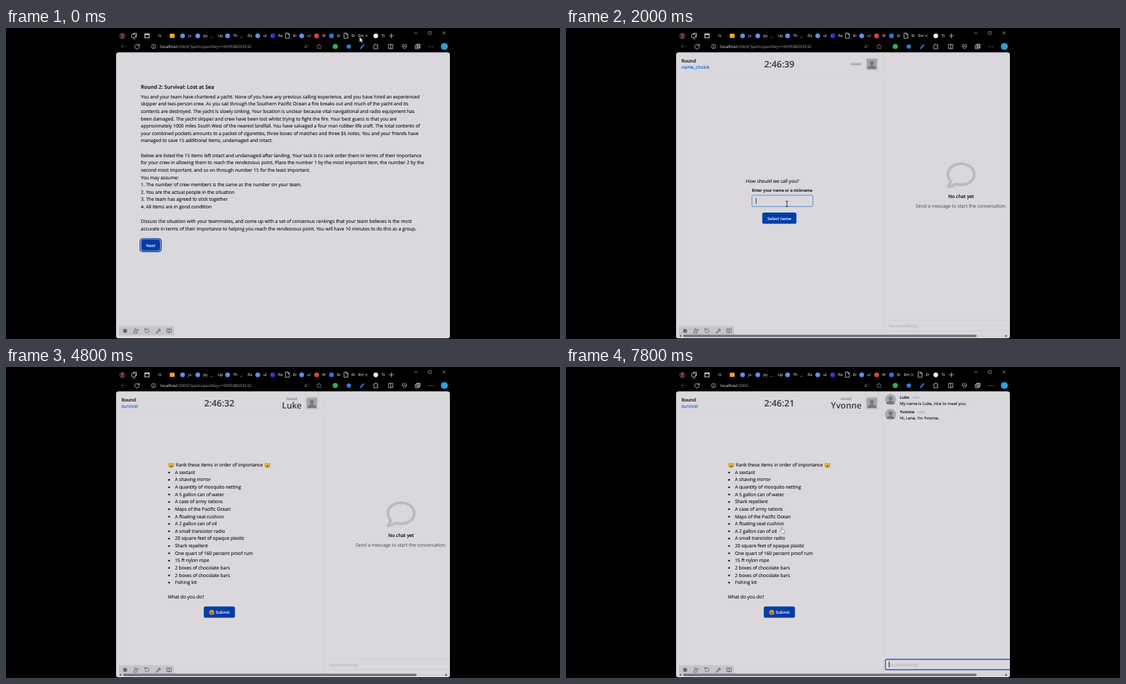
An HTML page for the animation above (8 s loop, 800 by 450 pixels).

```html
<!DOCTYPE html>
<html lang="en">
<head>
<meta charset="utf-8">
<title>Lost at Sea</title>
<style>
  html, body { margin: 0; width: 100%; height: 100%; overflow: hidden; background: #000; }
  svg { display: block; width: 100%; height: 100%; }
  text { font-family: "Open Sans", "Noto Sans", sans-serif; text-rendering: geometricPrecision; white-space: pre; }
</style>
</head>
<body>
<svg id="stage" viewBox="0 0 800 450"></svg>
<script>
const LOOP = 8000, TICK = 200, STEP = 10.62;
const INK = '#0d0c11', PAGE = '#dad8dc', BLUE = '#003da9', LINK = '#0b57c9', BODY = 6.71, SMALL = 5.92;
const USER = 'Luke', PEER = 'Yvonne';
const HELLO = `My name is ${USER}, nice to meet you.`, REPLY = `Hi, Lena. I'm ${PEER}.`;

const INTRO = [
  'You and your team have chartered a yacht. None of you have any previous sailing experience, and you have hired an experienced',
  'skipper and two-person crew. As you sail through the Southern Pacific Ocean a fire breaks out and much of the yacht and its',
  'contents are destroyed. The yacht is slowly sinking. Your location is unclear because vital navigational and radio equipment has',
  'been damaged. The yacht skipper and crew have been lost whilst trying to fight the fire. Your best guess is that you are',
  'approximately 1000 miles South West of the nearest landfall. You have salvaged a four man rubber life craft. The total contents of',
  'your combined pockets amounts to a packet of cigarettes, three boxes of matches and three $5 notes. You and your friends have',
  'managed to save 15 additional items, undamaged and intact.',
  '',
  'Below are listed the 15 items left intact and undamaged after landing. Your task is to rank order them in terms of their importance',
  'for your crew in allowing them to reach the rendezvous point. Place the number 1 by the most important item, the number 2 by the',
  'second most important, and so on through number 15 for the least important.',
  'You may assume:',
  '1. The number of crew members is the same as the number on your team.',
  '2. You are the actual people in the situation',
  '3. The team has agreed to stick together',
  '4. All items are in good condition',
  '',
  'Discuss the situation with your teammates, and come up with a set of consensus rankings that your team believes is the most',
  'accurate in terms of their importance to helping you reach the rendezvous point. You will have 10 minutes to do this as a group.'
];
const ITEMS = ['A sextant', 'A shaving mirror', 'A quantity of mosquito netting', 'A 5 gallon can of water',
  'A case of army rations', 'Maps of the Pacific Ocean', 'A floating seat cushion', 'A 2 gallon can of oil',
  'A small transistor radio', '20 square feet of opaque plastic', 'Shark repellent',
  'One quart of 160 percent proof rum', '15 ft nylon rope', '2 boxes of chocolate bars',
  '2 boxes of chocolate bars', 'Fishing kit'];
const RANKED = [...ITEMS];
RANKED.splice(4, 0, RANKED.splice(10, 1)[0]);

// Markup helpers; text is placed by its optical middle, with a hairline stroke for a firmer weight
const text = (x, y, s, size = BODY, fill = INK, weight = 400, extra = '') =>
  `<text x="${x}" y="${(y + size * .35).toFixed(2)}" font-size="${size}" fill="${fill}" stroke="${fill}" stroke-width=".1" font-weight="${weight}" ${extra}>${s}</text>`;
const rect = (x, y, w, h, fill, r = 0, extra = '') =>
  `<rect x="${x}" y="${y}" width="${w}" height="${h}" rx="${r}" fill="${fill}" ${extra}/>`;
const dot = (x, y, r, fill, extra = '') => `<circle cx="${x}" cy="${y}" r="${r}" fill="${fill}" ${extra}/>`;
const line = (d, stroke, w = .8, extra = '') =>
  `<path d="${d}" fill="none" stroke="${stroke}" stroke-width="${w}" stroke-linecap="round" stroke-linejoin="round" ${extra}/>`;
const group = (id, body) => `<g id="${id}">${body}</g>`;
const place = (x, y, body) => `<g transform="translate(${x} ${y})">${body}</g>`;
const MID = 'text-anchor="middle"', END = 'text-anchor="end"';
const button = (x, y, w, label, tx) =>
  rect(x, y, w, 16.3, BLUE, 2.6) + text(tx, y + 8.5, label, 5.8, '#e4e4ee', 600);

const docIcon = x => line(`M${x - 2.5} 7.3h3.2l2 2v5.6h-5.2zM${x + .6} 7.5v2h2`, '#d8d8d8');
const cross = (x, y, r) => line(`M${x - r} ${y - r}l${2 * r} ${2 * r}m0 ${-2 * r}l${-2 * r} ${2 * r}`, '#bbb', .7);
const label = (x, s) => text(x, 11.3, s, 5.6, '#c4c4c4');

function tabStrip() {
  const blue = '#5b93ea';
  const tabs = [[255, blue, 'jan'], [277, blue, 'py'], [298, '', 'Up'], [320, blue, 'Th'], [341, '', 'Ra'],
    [363.5, blue, 'ult'], [385, '#4a2fd0', 'Re'], [406.5, 'doc', 'Er'], [427, blue, 'ult'],
    [448.5, '#e5452c', 'W'], [470, '#2f78d6', 'Er'], [534, '#f0f0f0', 'Tc']];
  const icon = (x, c) => c === 'doc' ? docIcon(x) : c ? dot(x, 11.3, 3.4, c) : label(x - 2.5, '_');
  return tabs.map(([x, c, s]) => icon(x, c) + label(x + 8, s.slice(0, 2))).join('') +
    label(220, 'G') + rect(236.5, 8.2, 7, 6.2, '#f2a81c', 1) +
    group('tabA', docIcon(491) + label(499, 'Er') + label(508.5, 'Em') + cross(520.5, 11.3, 1.6)) +
    group('tabB', label(488, 'Em') + cross(500, 11.3, 1.6) + docIcon(511.5) + label(519.5, 'Er'));
}

function chrome() {
  const c = '#cfcfcf';
  return dot(168, 11.5, 4.8, '#3a2523') + dot(168, 10, 1.7, '#8b5a4c') + rect(165.5, 12.2, 5, 3.2, '#7d2f35', 1.6) +
    line('M182 9h5v5h-5zM184 9v-1.5h4.5v5H187M184 16h2', c) +
    line('M200.5 8.3h6.4v6h-6.4zM200.5 9.6h6.4', c, 1.1) +
    tabStrip() +
    line('M553.5 11.2h6m-3-3v6', c) + line('M590 7.3h3.6', '#bbb', .7) + line('M610.3 5.4h3.8v3.8h-3.8z', '#bbb', .6) + cross(632.3, 7.3, 1.9) +
    line('M173 26.8h-6.5m2.8-2.8l-2.8 2.8l2.8 2.8', '#4a4a4a') +
    line('M192.2 25.3a3.4 3.4 0 1 0 .4 2.4M192.6 23.3v2.4h-2.4', c) +
    dot(213, 26.8, 3.1, 'none', `stroke="${c}" stroke-width=".7"`) + line('M213 26.6v1.8m0-3.3v.1', c) +
    `<text x="223" y="29" font-size="5.92" fill="#f0f0f0">localhost<tspan fill="#a2a2a2" id="path"></tspan></text>` +
    text(431, 27, 'A', 6, '#8a8a8a') + line('M436 23.8q1.2 1 .1 2.4', '#8a8a8a', .6) +
    line('M452 23.3l1.1 2.3l2.5.3l-1.8 1.8l.5 2.5l-2.3-1.2l-2.3 1.2l.5-2.5l-1.8-1.8l2.5-.3z', '#999', .6) +
    dot(475.5, 26.8, 3.7, '#2fae55') + dot(495, 26.8, 3.1, '#2c7be0') +
    line('M512 29.5l4.5-5', '#2476e8', 2) +
    line('M531.5 24.5h1.5q0-1.5 1.2-1.5t1.2 1.5h1.6v1.8q-1.4 0-1.4 1t1.4 1v1.8h-5.5z', c) +
    line('M552.7 23.7h6v6.2h-6zM555.7 23.7v6.2', c) +
    line('M575.3 30l-3-3q-1-2 .4-3.1q1.6-.8 2.6.8q1-1.6 2.6-.8q1.4 1.1.4 3.1zM573 26.8h1.3l1-1.3l1 2l.6-.7h1.3', c, .7) +
    line('M591.5 25h5v5h-5zM593 25v-1.5h5v4.7h-1.3M594 26.3v2.5m-1.2-1.2h2.5', c, .9) +
    [611.5, 614, 616.5].map(x => dot(x, 27, .6, c)).join('') + dot(633, 26.8, 5, '#27a3dc');
}

function toolbar() {
  const c = '#55545a';
  return rect(163, 431.5, 80, 13.2, '#c6c4ca', 1.5) + dot(172, 438.3, 3, '#6b6a70') +
    dot(186.8, 436.6, 1.5, 'none', `stroke="${c}" stroke-width=".7"`) +
    line('M184 441.2q0-2.6 2.8-2.6t2.8 2.6zM189.2 437.2h2.2m-1.1-1.1v2.2', c, .7) +
    line('M201.2 436.4a2.9 2.9 0 1 1-.5 2.4M200.6 434.8v1.9h1.9', c) +
    line('M217 440.8l2.8-2.8q-.4-2.5 2.3-2.7l-1 1.3l.8.8l1.2-1q0 2.5-2.6 2.5l-2.6 2.8z', c) +
    line('M235.5 436q-1.5-.8-3.2-.6v5q1.7-.2 3.2.6q1.5-.8 3.2-.6v-5q-1.7-.2-3.2.6zv5', c);
}

const cat = x => place(x, 142,
  `<path d="M-3.6 -3.8l1.8 1.2h3.6l1.8-1.2l.3 5.4q-1 2.4-3.9 2.4t-3.9-2.4z" fill="#e6900f"/>` +
  dot(-1.4, -.6, .8, '#f6e3b0') + dot(1.4, -.6, .8, '#f6e3b0') + dot(0, 1.8, .9, '#6b3510') +
  dot(-3, 2.3, 1.1, '#f0aa35') + dot(3, 2.3, 1.1, '#f0aa35'));
const hug = place(297, 355, dot(0, 0, 3.5, '#eda52a') + dot(-1.2, -.9, .5, '#5c3010') + dot(1.2, -.9, .5, '#5c3010') +
  `<path d="M-1.7 .4h3.4q-.4 1.7-1.7 1.7t-1.7-1.7z" fill="#70330f"/>` + dot(-2.4, 2.2, 1.1, '#d9830f') + dot(2.4, 2.2, 1.1, '#d9830f'));

const person = dot(0, -1.6, 3, '#77767a') + `<path d="M-6 6.6q.4-4.6 6-4.6t6 4.6z" fill="#77767a"/>`;
const message = (id, y, who, words) => group(id,
  place(468.6, y + 3.5, dot(0, 0, 8, '#a9a8ac') + person) +
  text(482, y, `${who}<tspan dx="3.4" font-weight="400" fill="#96959c" stroke="none">now</tspan>`, SMALL, INK, 600) +
  text(482, y + 9, words, SMALL));

const FAINT = '#d1cfd4';
const game =
  line('M163 66.3h294', FAINT, .7) + line('M457.7 38v404', FAINT, .7) + line('M166.5 67v364', '#d5d3d8', .6) +
  text(166.7, 48, 'Round', BODY, INK, 600) + text(166.7, 57, '', 6.62, LINK, 500, 'id="stageName"') +
  text(308, 53, '', 12.8, '#3a3f4d', 600, `id="clock" ${MID}`) +
  text(0, 0, 'NAME', 5, '#85858e', 600, `id="nameTag" letter-spacing=".18" ${MID}`) +
  text(427, 56, '', 12.4, '#3f4350', 600, `id="player" ${END}`) +
  rect(431.5, 42.5, 20.5, 19.5, 'none', 2, `stroke="${FAINT}" stroke-width=".6"`) +
  group('avatar', place(441.7, 52.3, rect(-7.8, -8, 15.6, 16, '#a5a4a8') + person)) +
  group('noChat',
    line('M570.5 196.5c11 0 19 6.8 19 15.2s-8 15.2-19 15.2q-4.3 0-8-1.3q-5.2 4-11 4q3.4-3.8 4-8.2q-4-4.3-4-9.7c0-8.4 8-15.2 19-15.2z', '#b9bbc4', 4.2) +
    text(570.5, 243.5, 'No chat yet', BODY, INK, 600, MID) +
    text(570.5, 257.5, 'Send a message to start the conversation.', 6.72, '#5f5e67', 400, MID)) +
  message('msgA', 43.6, USER, HELLO) + message('msgB', 65, PEER, REPLY) +
  rect(461.2, 423, 185, 15, 'none', 2, 'id="chatBox"') +
  text(466.3, 431.2, '', 6, INK, 400, 'id="chatText"') + rect(466.2, 426.5, .9, 8, INK, 0, 'id="chatCaret"') +
  rect(159, 444, 482, 4.2, '#d5d3d7') + rect(169, 443.8, 424, 3.5, '#737277', 1.75) +
  `<path d="M163.5 445.5l3-2v4zM637.5 445.5l-3-2v4z" fill="#5f5e63"/>`;

const naming =
  text(259.8, 221.3, 'How should we call you?', 6.75) +
  text(268.4, 234.5, 'Enter your name or a nickname', 5.76, INK, 600) +
  rect(268.5, 242, 88, 16.3, 'none', 2, 'id="nameBox"') + text(274.3, 250.7, '', 6.1, INK, 400, 'id="nameText"') +
  rect(274.2, 246, .8, 8.5, INK, 0, 'id="nameCaret"') + button(283.4, 267, 49.3, 'Select name', 291);

const survival =
  cat(238.5) + cat(377.5) + text(245.3, 142, 'Rank these items in order of importance') +
  ITEMS.map((s, i) => dot(235.5, 152.7 + i * STEP, 1.25, INK) + text(244, 152.5 + i * STEP, s, BODY, INK, 400, 'class="item"')).join('') +
  text(233.7, 333, 'What do you do?') + button(285.6, 346.5, 45, 'Submit', 303) + hug;

const intro =
  text(194.8, 85.2, 'Round 2: Survival: Lost at Sea', 7.5, INK, 600) +
  INTRO.map((s, i) => text(194.8, 99.4 + i * STEP, s)).join('') +
  rect(193.6, 304.9, 30.6, 18.8, '#eceaf0', 3.6, `stroke="${BLUE}" stroke-width="1.3"`) + button(195.2, 306.1, 27.5, 'Next', 202.2);

const cursors =
  group('arrow', '<path d="M0 0v7.2l1.7-1.5l1.2 2.6l1.2-.6l-1.2-2.5h2.3z" fill="#fff" stroke="#333" stroke-width=".4"/>') +
  group('hand', '<path d="M-1 0q.7-.8 1.3 0v3.2l3 .7q.8.3.7 1.3l-.7 3.3h-4l-2.6-3.2q.3-1.2 1.3-.5l1 .7z" fill="#fff" stroke="#444" stroke-width=".5"/>') +
  group('beam', line('M-1.6-3.7h3.2M0-3.7v7.4M-1.6 3.7h3.2', '#222', .8));

const stage = document.getElementById('stage');
const win = fill => rect(159, 35.3, 482, 413.6, fill, 3.5);
stage.innerHTML = chrome() + win(PAGE) + `<clipPath id="win">${win(PAGE)}</clipPath>` +
  `<g clip-path="url(#win)">${toolbar()}${group('intro', intro)}${group('game', game + group('naming', naming) + group('survival', survival))}</g>` + cursors;

const $ = id => document.getElementById(id);
const items = [...document.querySelectorAll('.item')];
const show = (id, on) => $(id).setAttribute('display', on ? 'inline' : 'none');
const put = (id, s) => { $(id).textContent = s; };
const attrs = (id, o) => { for (const k in o) $(id).setAttribute(k, o[k]); };
const typed = (s, t, from, to) => s.slice(0, Math.max(0, Math.round(s.length * Math.min(1, (t - from) / (to - from)))));

// Interpolates a list of [time, value, value, tag]
function along(keys, t) {
  let i = 0;
  while (i < keys.length - 2 && t >= keys[i + 1][0]) i++;
  const a = keys[i], b = keys[i + 1], p = Math.min(1, Math.max(0, (t - a[0]) / (b[0] - a[0])));
  return { at: k => a[k] + (b[k] - a[k]) * p, tag: p < 1 ? a[3] : b[3] };
}

const SECONDS = [[600, 40], [2000, 39], [3400, 38], [4800, 32], [6000, 27], [7800, 21]];
const POINTER = [[0, 510.5, 13, 'arrow'], [600, 211, 311, 'hand'], [1200, 211, 311, 'arrow'], [1800, 319, 254.5, 'beam'],
  [3400, 319, 254.5, 'beam'], [3800, 309, 275, 'hand'], [4200, 309, 275, 'arrow'], [4600, 420, 380, ''],
  [5000, 516, 431, 'beam'], [5600, 516, 431, 'arrow'], [6000, 516, 167.5, 'arrow'], [6400, 494, 13, 'arrow'],
  [6600, 510, 431, 'beam'], [7000, 510, 431, 'arrow'], [7400, 300, 259, 'hand'], [7600, 300, 196, 'hand'], [7800, 312, 232, 'hand']];

function draw(t) {
  const peer = t >= 6400, ranking = t >= 4200, inGame = t >= 800;
  show('intro', !inGame); show('game', inGame);
  show('naming', !ranking); show('survival', ranking);
  show('tabA', !peer); show('tabB', peer);
  put('path', peer ? ':3000' : ':3000/?participantKey=1699588093532');

  put('stageName', ranking ? 'survival' : 'name_choice');
  put('clock', '2:46:' + Math.round(along(SECONDS, t).at(1)));
  put('player', ranking ? (peer ? PEER : USER) : '');
  const half = ranking ? $('player').getComputedTextLength() / 2 : 8;
  attrs('nameTag', { x: 427 - half, y: ranking ? 47.8 : 54.2 });
  show('avatar', t >= 1200);

  const name = typed(USER, t, 2200, 3200), nameFocus = t >= 1800 && t < 4000;
  put('nameText', name);
  attrs('nameBox', { stroke: nameFocus ? '#4a86d0' : '#bcbac2', 'stroke-width': nameFocus ? .9 : .6 });
  show('nameCaret', nameFocus && !name);

  const draft = t < 5800 ? typed(HELLO, t, 5000, 5600) : peer && t < 7200 ? typed(REPLY, t, 6600, 7000) : '';
  const chatFocus = t >= 5000 && !(t >= 6400 && t < 6600);
  const chatInk = draft ? INK : '#b4b2b9';
  put('chatText', draft || 'Say something');
  attrs('chatText', { fill: chatInk, stroke: chatInk });
  attrs('chatBox', { stroke: chatFocus ? '#1f5fbd' : '#c6c4cb', 'stroke-width': chatFocus ? 1.3 : .6 });
  show('chatCaret', chatFocus && !draft);
  show('noChat', t < 5800); show('msgA', t >= 5800); show('msgB', t >= 7200);

  const order = t >= 7600 ? RANKED : ITEMS;
  items.forEach((el, i) => { el.textContent = order[i]; });

  const p = along(POINTER, t);
  for (const id of ['arrow', 'hand', 'beam']) {
    show(id, p.tag === id);
    attrs(id, { transform: `translate(${p.at(1)} ${p.at(2)})` });
  }
}

const start = performance.now();
function frame() {
  const t = Math.max(0, performance.now() - start) % LOOP;
  draw(Math.floor(t / TICK) * TICK);
  requestAnimationFrame(frame);
}
frame();
</script>
</body>
</html>
```
